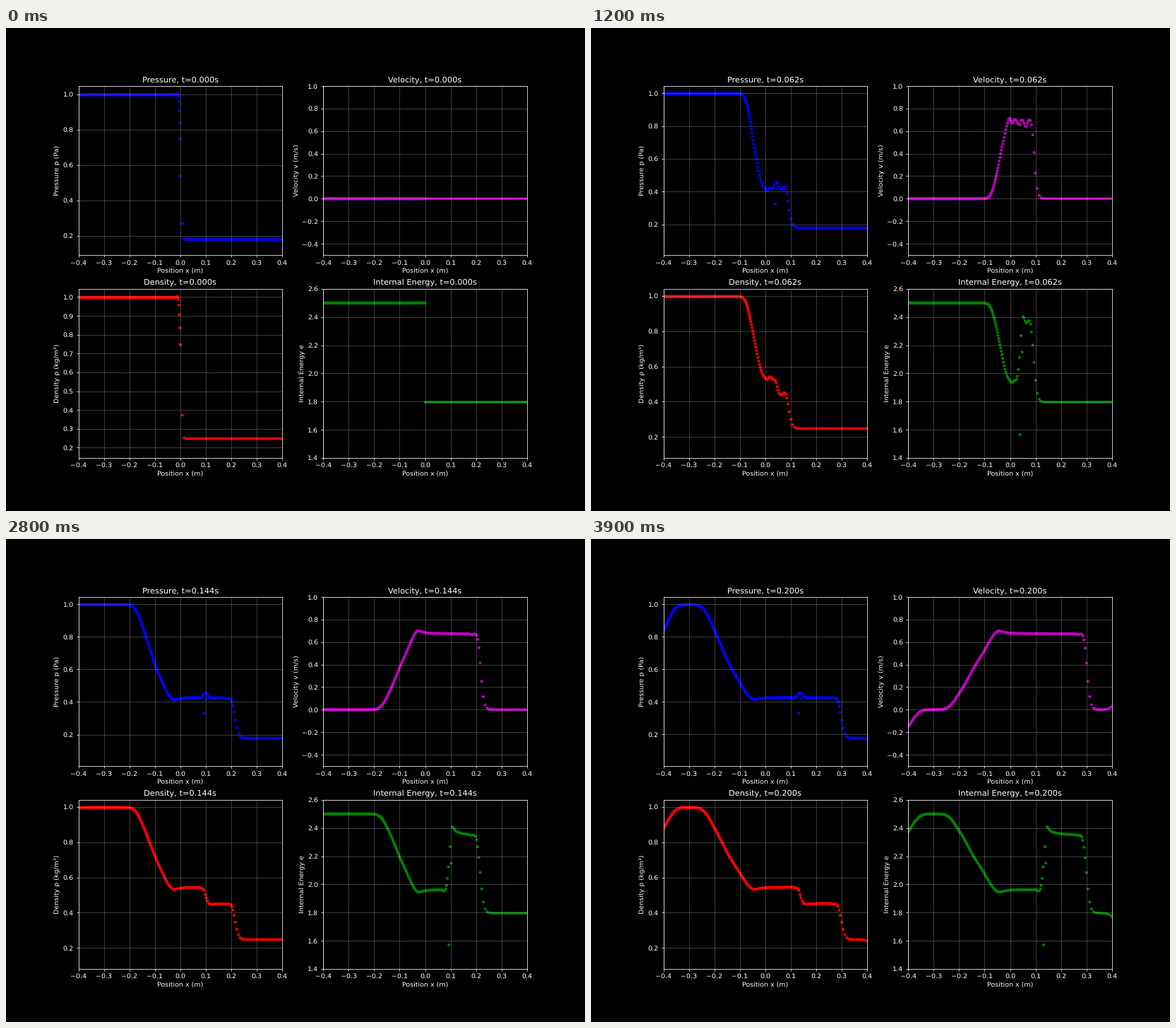
A matplotlib script for the animation above (4000 ms loop, 820 px wide and 683 px high).

```python
import numpy as np
import matplotlib.pyplot as plt
from matplotlib.animation import FuncAnimation

# Shock tube solved with smoothed particle hydrodynamics
GAMMA = 1.4
MASS = 0.001875
H = 0.01
ALPHA = BETA = 1.0
N_LEFT, N_RIGHT = 320, 80
N = N_LEFT + N_RIGHT
FRAMES = 40
T_END = 0.2
SUBSTEPS = 2


def kernel(q):
    return np.where(q < 1, 2 / 3 - q**2 + q**3 / 2, (2 - q)**3 / 6) / H


def kernel_slope(q):
    return np.where(q < 1, -2 * q + 1.5 * q**2, -(2 - q)**2 / 2) / H**2


def neighbours(x):
    gap = x[:, None] - x[None, :]
    i, j = np.nonzero(np.abs(gap) < 2 * H)
    return i, j, gap[i, j]


def gather(i, values):
    return np.bincount(i, MASS * values, minlength=N)


def gas_state(x, e):
    i, j, dx = neighbours(x)
    rho = gather(i, kernel(np.abs(dx) / H))
    return i, j, dx, rho, (GAMMA - 1) * rho * e


def rates(y):
    x, v, e = y
    i, j, dx, rho, p = gas_state(x, e)
    slope = np.sign(dx) * kernel_slope(np.abs(dx) / H)
    dv = v[i] - v[j]

    # Artificial viscosity acts on approaching pairs only
    c = np.sqrt((GAMMA - 1) * e)
    phi = np.minimum(H * dv * dx / (dx**2 + (0.1 * H)**2), 0)
    c_mean = (c[i] + c[j]) / 2
    rho_mean = (rho[i] + rho[j]) / 2
    visc = (-ALPHA * c_mean * phi + BETA * phi**2) / rho_mean

    s = p / rho**2
    push = (s[i] + s[j] + visc) * slope
    return np.array([v, -gather(i, push), 0.5 * gather(i, push * dv)])


def rk4(y, dt):
    k1 = rates(y)
    k2 = rates(y + dt / 2 * k1)
    k3 = rates(y + dt / 2 * k2)
    k4 = rates(y + dt * k3)
    return y + dt / 6 * (k1 + 2 * k2 + 2 * k3 + k4)


def simulate():
    x = np.concatenate([np.linspace(-0.6, 0, N_LEFT),
                        np.linspace(0, 0.6, N_RIGHT)])
    e = np.where(np.arange(N) < N_LEFT, 2.5, 1.795)
    y = np.array([x, np.zeros(N), e])
    dt = T_END / (FRAMES - 1) / SUBSTEPS
    states = [y]
    for _ in range(FRAMES - 1):
        for _ in range(SUBSTEPS):
            y = rk4(y, dt)
        states.append(y)
    return states


states = simulate()
times = np.linspace(0, T_END, FRAMES)

plt.style.use("dark_background")
plt.rcParams["font.family"] = "DejaVu Sans"
plt.rcParams["text.hinting"] = "none"
fig, axes = plt.subplots(2, 2, figsize=(12, 9.9952), dpi=820 / 12)

# title, y label, colour, fixed y limits (None follows the data)
PANELS = [
    ("Pressure", "Pressure p (Pa)", "b", None),
    ("Velocity", "Velocity v (m/s)", "m", (-0.5, 1.0)),
    ("Density", "Density ρ (kg/m³)", "r", None),
    ("Internal Energy", "Internal Energy e", "g", (1.4, 2.6)),
]

# One size per dot: a shared size would round dots to whole pixels
SIZES = np.full(N, 10.0)

dots = []
for ax, (name, label, color, limits) in zip(axes.flat, PANELS):
    dots.append(ax.scatter(np.zeros(N), np.zeros(N), s=SIZES, color=color))
    ax.set_xlim(-0.4, 0.4)
    if limits:
        ax.set_ylim(*limits)
    ax.set_xlabel("Position x (m)")
    ax.set_ylabel(label)
    ax.grid(True, color="white", alpha=0.3)


def update(k):
    x, v, e = states[k]
    *_, rho, p = gas_state(x, e)
    for ax, dot, panel, data in zip(axes.flat, dots, PANELS, (p, v, rho, e)):
        dot.set_offsets(np.column_stack([x, data]))
        ax.set_title(f"{panel[0]}, t={times[k]:.3f}s")
        if panel[3] is None:
            margin = 0.05 * np.ptp(data)
            ax.set_ylim(data.min() - margin, data.max() + margin)
    return dots


anim = FuncAnimation(fig, update, frames=FRAMES, interval=100,
                     repeat=True, repeat_delay=0, blit=False)
plt.show()
```
